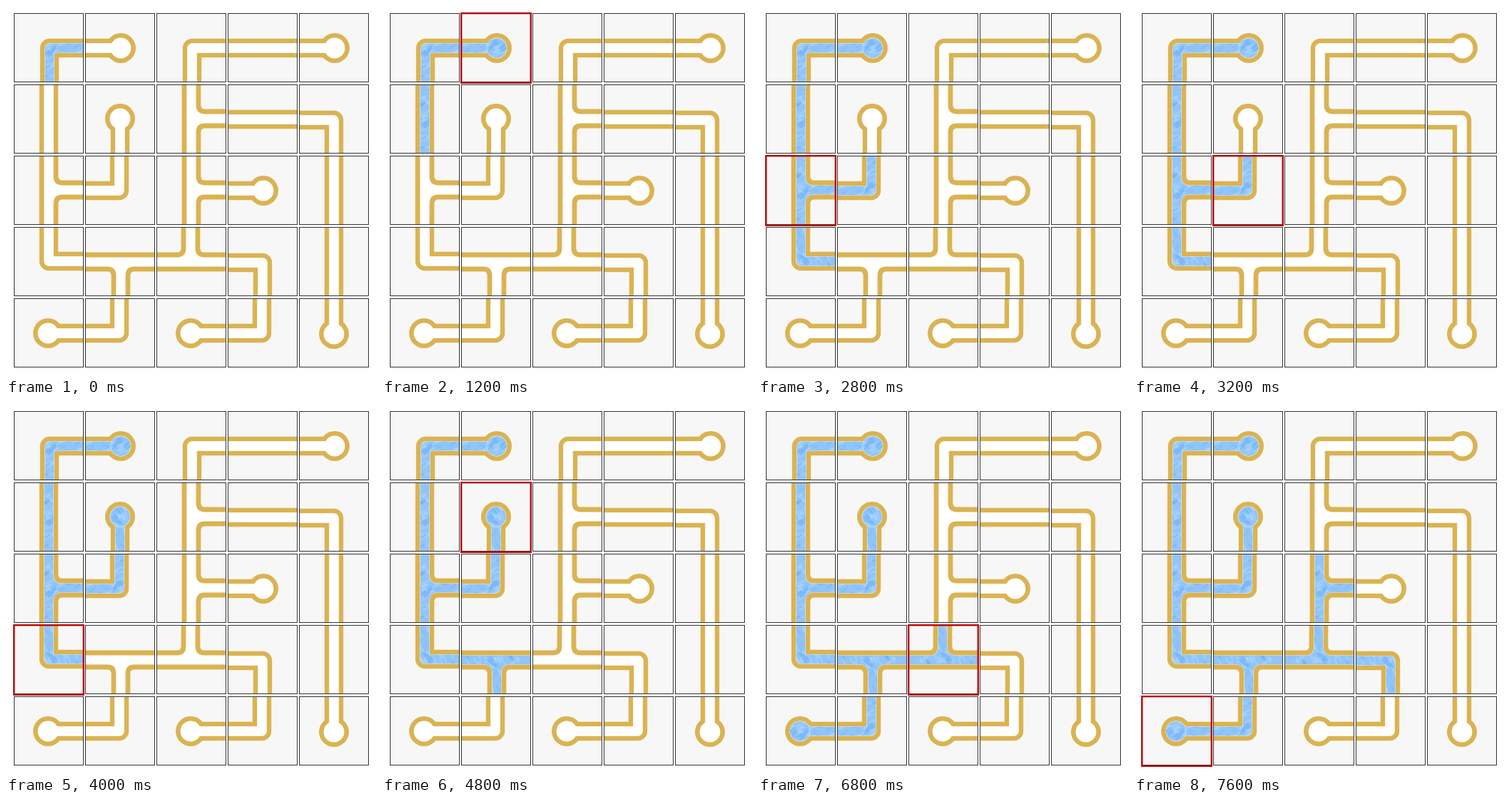
Write an HTML page that moves like this. It is 519 px wide and 519 px high and loops after 8000 ms.

```html
<!DOCTYPE html>
<html lang="en">
<head>
<meta charset="utf-8">
<title>Pipe flood fill</title>
<style>
html, body { margin: 0; width: 100%; height: 100%; overflow: hidden; background: #fff; }
svg { display: block; width: 100%; height: 100%; }
path { fill: none; stroke-linejoin: round; }
.box { fill: #f7f7f7; }
.frame { fill: none; stroke: #333; }
.mark { fill: none; stroke: #b80808; stroke-width: 2.4; }
</style>
</head>
<body>
<svg id="stage" viewBox="0 0 519 519">
  <defs>
    <pattern id="water" x="-48" y="-48" width="96" height="96" patternUnits="userSpaceOnUse">
      <rect width="96" height="96" fill="#90c5fc"/>
    </pattern>
  </defs>
</svg>
<script>
const STEP = 400, LOOP = 8000;
const GOLD = '#dab352', WATER = 'url(#water)';
const stage = document.getElementById('stage');

// Shape letter plus clockwise quarter turns.
const layout = [
  'c0 e2 c0 s1 e2',
  's0 e1 t0 s1 c1',
  't0 c2 t0 e2 s0',
  'c3 t1 t3 c1 s0',
  'e0 c2 e0 c2 e3'
].map(row => row.split(' '));

const center = {
  e: 'M-1 0H48',
  s: 'M0-48V48',
  c: 'M1 48V0H48',
  t: 'M0-48V48M0-1H48'
};
const teeWalls = 'M-10-48V48M10-48V-20Q10-11 19-11H48M10 48V18Q10 9 19 9H48';

// Cells are named row then column.
const fillStep = {
  '00': 0, '01': 2, '10': 2, '20': 5, '21': 7, '30': 7, '11': 9,
  '31': 11, '41': 14, '32': 14, '40': 16, '22': 18, '33': 18
};
const visited = ' 00 00 01 10 10 20 20 21 21 30 30 11 31 31 41 41 32 32 40'.split(' ');

function add(parent, tag, attrs) {
  const el = document.createElementNS('http://www.w3.org/2000/svg', tag);
  for (const key in attrs) el.setAttribute(key, attrs[key]);
  return parent.appendChild(el);
}

function line(parent, d, stroke, width) {
  return add(parent, 'path', { d, stroke, 'stroke-width': width });
}

function panel(parent, cls) {
  return add(parent, 'rect', { x: -48.5, y: -48.5, width: 97, height: 96, class: cls });
}

function disc(parent, r, fill) {
  return add(parent, 'circle', { cx: -1, r, fill });
}

function place(row, col) {
  return `translate(${60 + 100 * col} ${59 + 100 * row})`;
}

function paintWater() {
  let seed = 11;
  const random = () => (seed = (seed * 16807) % 2147483647) / 2147483647;
  const tones = ['#b4d8ff', '#6fb0f5', '#a3d0ff', '#7cb8f8'];
  const pattern = document.getElementById('water');
  for (let i = 0; i < 170; i++) {
    const x = random() * 96, y = random() * 96;
    add(pattern, 'ellipse', {
      cx: x, cy: y, rx: 3 + random() * 4, ry: 1 + random() * 1.6,
      fill: tones[i % 4], opacity: 0.6,
      transform: `rotate(${-50 + random() * 30} ${x} ${y})`
    });
  }
}

function makeTile(code, row, col) {
  const kind = code[0], d = center[kind];
  const tile = add(stage, 'g', { transform: place(row, col) });
  panel(tile, 'box');
  const pipe = add(tile, 'g', { transform: `rotate(${90 * code[1]})` });
  const inner = [];
  if (kind === 't') {
    inner.push(line(pipe, d, '#fff', 20));
    line(pipe, teeWalls, '#fff', 7.6);
    line(pipe, teeWalls, GOLD, 6.8);
  } else {
    line(pipe, d, GOLD, 26.4);
    if (kind === 'e') disc(pipe, 21, GOLD);
    line(pipe, d, '#fff', 13.4);
    inner.push(line(pipe, d, '#fff', 12.8));
    if (kind === 'e') {
      disc(pipe, 14.4, '#fff');
      inner.push(disc(pipe, 14, '#fff'));
    }
  }
  panel(tile, 'frame');
  return { name: `${row}${col}`, inner };
}

paintWater();
const tiles = layout.flatMap((row, r) => row.map((code, c) => makeTile(code, r, c)));
const mark = add(stage, 'rect', { x: -48.8, y: -48.8, width: 97.6, height: 97.6, class: 'mark' });

function draw(time) {
  const step = Math.floor((time % LOOP) / STEP);
  for (const { name, inner } of tiles) {
    const paint = step >= fillStep[name] ? WATER : '#fff';
    for (const el of inner) el.setAttribute(el.tagName === 'circle' ? 'fill' : 'stroke', paint);
  }
  const cell = visited[step];
  mark.setAttribute('visibility', cell ? 'visible' : 'hidden');
  if (cell) mark.setAttribute('transform', place(cell[0], cell[1]));
}

let start;
function tick(now) {
  start ??= now;
  draw(now - start);
  requestAnimationFrame(tick);
}
draw(0);
requestAnimationFrame(tick);
</script>
</body>
</html>
```
